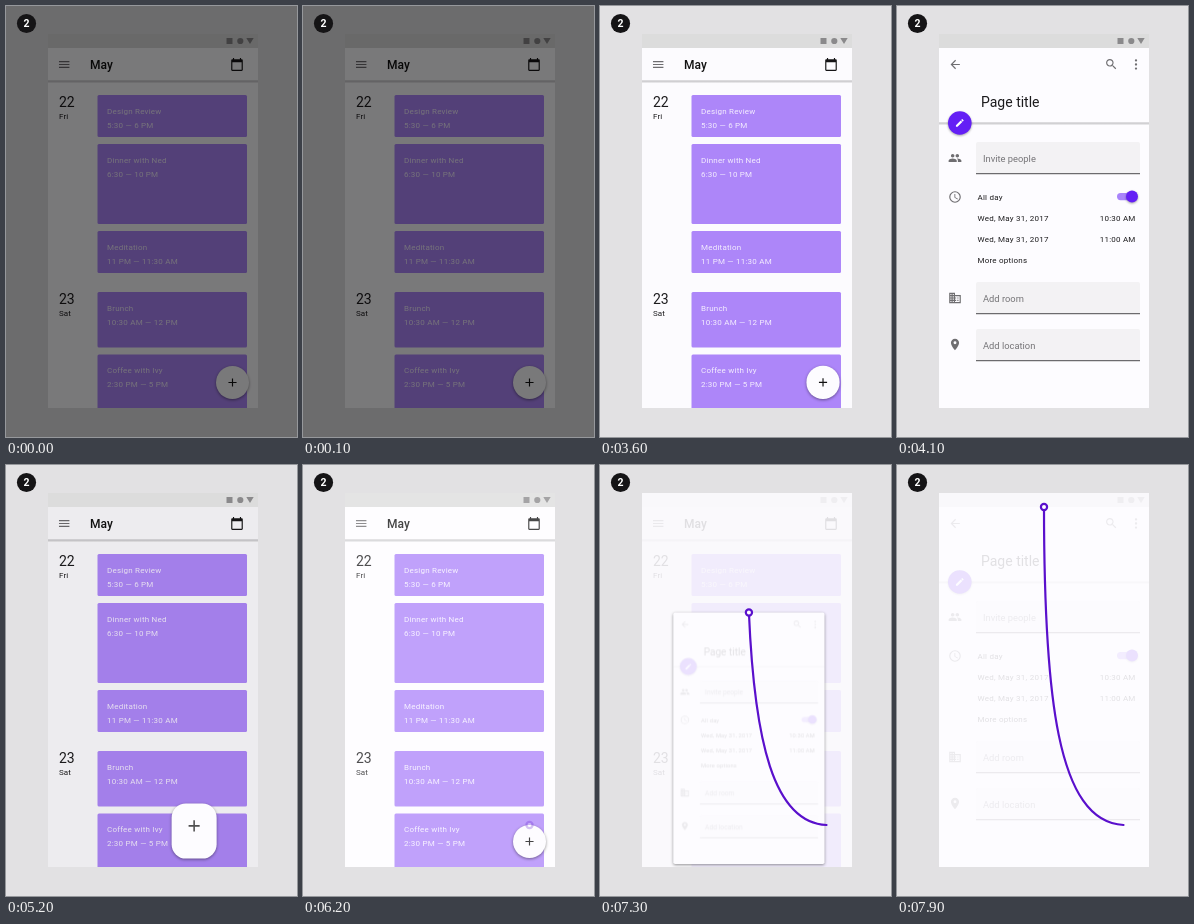
An HTML page for the animation above (8 s loop, 291 by 431 pixels).

```html
<!DOCTYPE html>
<html lang="en">
<head>
<meta charset="utf-8">
<title>Calendar container transform</title>
<style>
  html, body { margin: 0; width: 100%; height: 100%; overflow: hidden; background: #e2e1e3; }
  svg { display: block; width: 100%; height: 100%; }
  text { font-family: Roboto, sans-serif; }
  #box { filter: drop-shadow(0 1.5px 1.8px rgba(0, 0, 0, .42)); }
  .raised { filter: drop-shadow(0 1.2px 1.2px rgba(0, 0, 0, .35)); }
</style>
</head>
<body>
<svg viewBox="0 0 291 431" preserveAspectRatio="none">
  <defs>
    <clipPath id="screen"><rect x="42" y="42" width="210" height="360"/></clipPath>
    <clipPath id="boxClip"><rect id="boxHole"/></clipPath>
    <linearGradient id="fade" x2="0" y2="1">
      <stop stop-color="#000" stop-opacity=".26"/>
      <stop offset="1" stop-color="#000" stop-opacity="0"/>
    </linearGradient>
  </defs>
  <rect width="291" height="431" fill="#e2e1e3"/>
  <rect x="42" y="28" width="210" height="374" fill="#fdfcff"/>
  <rect x="42" y="28" width="210" height="14" fill="#dcdcdc"/>
  <g fill="#8a898b">
    <rect x="220.5" y="32" width="6" height="6"/>
    <circle cx="234.3" cy="35" r="3.1"/>
    <path d="M240.3 32h7.4l-3.7 6z"/>
  </g>
  <g clip-path="url(#screen)">
    <g id="calendar"></g>
    <rect id="scrim" x="42" y="42" width="210" height="360"/>
  </g>
  <rect id="veil" x="42" y="28" width="210" height="374" fill="#fdfcff"/>
  <g clip-path="url(#screen)">
    <rect id="box" fill="#fdfcff"/>
    <g clip-path="url(#boxClip)">
      <g id="page"></g>
      <g id="plus"></g>
    </g>
  </g>
  <path id="trail" fill="none" stroke="#5a10cc" stroke-width="2.2" stroke-linecap="round"/>
  <circle id="ring" r="3.1" fill="#fff" stroke="#5a10cc" stroke-width="2.2"/>
  <rect id="dim" width="291" height="431"/>
  <circle cx="20.5" cy="17.5" r="9.6" fill="#151416"/>
  <text x="20.5" y="21.2" font-size="10.5" font-weight="700" fill="#fff" text-anchor="middle">2</text>
</svg>
<script>
const $ = id => document.getElementById(id);
const set = (id, attrs) => {
  for (const k in attrs) $(id).setAttribute(k, attrs[k]);
};
const clamp = v => Math.min(1, Math.max(0, v));
const lerp = (a, b, t) => a + (b - a) * t;
const ramp = (t, from, span) => clamp((t - from) / span);

const ICONS = {
  menu: 'M3 18h18v-2H3v2zm0-5h18v-2H3v2zm0-7v2h18V6H3z',
  today: 'M20 3h-1V1h-2v2H7V1H5v2H4c-1.1 0-2 .9-2 2v16c0 1.1.9 2 2 2h16c1.1 0 2-.9 2-2V5c0-1.1-.9-2-2-2zm0 18H4V8h16v13z',
  add: 'M19 13h-6v6h-2v-6H5v-2h6V5h2v6h6v2z',
  back: 'M20 11H7.83l5.59-5.59L12 4l-8 8 8 8 1.41-1.41L7.83 13H20v-2z',
  search: 'M15.5 14h-.79l-.28-.27C15.41 12.59 16 11.11 16 9.5 16 5.91 13.09 3 9.5 3S3 5.91 3 9.5 5.91 16 9.5 16c1.61 0 3.09-.59 4.23-1.57l.27.28v.79l5 4.99L20.49 19l-4.99-5zm-6 0C7.01 14 5 11.99 5 9.5S7.01 5 9.5 5 14 7.01 14 9.5 11.99 14 9.5 14z',
  more: 'M12 3a2 2 0 0 1 0 4 2 2 0 0 1 0-4zm0 7a2 2 0 0 1 0 4 2 2 0 0 1 0-4zm0 7a2 2 0 0 1 0 4 2 2 0 0 1 0-4z',
  edit: 'M3 17.25V21h3.75L17.81 9.94l-3.75-3.75L3 17.25zM20.71 7.04a1 1 0 0 0 0-1.41l-2.34-2.34a1 1 0 0 0-1.41 0l-1.83 1.83 3.75 3.75 1.83-1.83z',
  people: 'M16 11c1.66 0 3-1.34 3-3s-1.34-3-3-3-3 1.34-3 3 1.34 3 3 3zm-8 0c1.66 0 3-1.34 3-3S9.66 5 8 5 5 6.34 5 8s1.34 3 3 3zm0 2c-2.33 0-7 1.17-7 3.5V19h14v-2.5c0-2.33-4.67-3.5-7-3.5zm8 0c-.29 0-.62.02-.97.05 1.16.84 1.97 1.97 1.97 3.45V19h6v-2.5c0-2.33-4.67-3.5-7-3.5z',
  clock: 'M12 2a10 10 0 1 0 0 20 10 10 0 1 0 0-20zm0 18a8 8 0 1 1 0-16 8 8 0 1 1 0 16zm.5-13H11v6l5.25 3.15.75-1.23-4.5-2.67z',
  room: 'M12 7V3H2v18h20V7H12zM6 19H4v-2h2v2zm0-4H4v-2h2v2zm0-4H4V9h2v2zm0-4H4V5h2v2zm4 12H8v-2h2v2zm0-4H8v-2h2v2zm0-4H8V9h2v2zm0-4H8V5h2v2zm10 12h-8v-2h2v-2h-2v-2h2v-2h-2V9h8v10zm-2-8h-2v2h2v-2zm0 4h-2v2h2v-2z',
  place: 'M12 2C8.13 2 5 5.13 5 9c0 5.25 7 13 7 13s7-7.75 7-13c0-3.87-3.13-7-7-7zm0 9.5a2.5 2.5 0 0 1 0-5 2.5 2.5 0 0 1 0 5z'
};
const icon = (name, x, y, fill = '#6f6e71', k = .58) =>
  `<path d="${ICONS[name]}" fill="${fill}" fill-rule="evenodd" transform="translate(${x} ${y}) scale(${k}) translate(-12 -12)"/>`;
const text = (s, x, y, size = 8, fill = '#1c1b1d', extra = '') =>
  `<text x="${x}" y="${y}" font-size="${size}" fill="${fill}" ${extra}>${s}</text>`;
const SPACED = 'letter-spacing=".22"';

const event = (y, h, title, hours) =>
  `<rect x="91.5" y="${y}" width="149.5" height="${h}" rx="1.5" fill="#ae87fa"/>` +
  text(title, 101, y + 18.7, 8, '#f6f0ff', SPACED) +
  text(hours, 101, y + 32.7, 8, '#f6f0ff', SPACED);
const day = (y, num, name) =>
  text(num, 53, y, 14) + text(name, 53, y + 12, 8, '#1c1b1d', 'letter-spacing=".1"');
const field = (y, label) =>
  `<path d="M79 ${y + 32}v-30q0-2 2-2h160q2 0 2 2v30z" fill="#f3f2f4"/>
   <rect x="79" y="${y + 31.2}" width="164" height="1" fill="#4c4b4e"/>` +
  text(label, 86, y + 19.6, 9.35, '#757477');
const slot = (y, hour) =>
  text('Wed, May 31, 2017', 80.5, y, 8, '#1c1b1d', 'letter-spacing=".25"') +
  text(hour, 238.5, y, 8, '#1c1b1d', 'text-anchor="end" letter-spacing=".2"');

$('calendar').innerHTML =
  day(101, '22', 'Fri') + day(297.5, '23', 'Sat') +
  event(89, 42, 'Design Review', '5:30 — 6 PM') +
  event(138, 80, 'Dinner with Ned', '6:30 — 10 PM') +
  event(225, 42, 'Meditation', '11 PM — 11:30 AM') +
  event(286, 55.5, 'Brunch', '10:30 AM — 12 PM') +
  event(348.5, 60, 'Coffee with Ivy', '2:30 PM — 5 PM') +
  '<rect x="42" y="74.5" width="210" height="3" fill="url(#fade)"/>' +
  icon('menu', 58.2, 58.5) + text('May', 84, 63, 12, '#111', 'font-weight="500"') +
  icon('today', 231, 58.5, '#151416');

$('page').innerHTML =
  '<rect x="42" y="116.5" width="210" height="3" fill="url(#fade)"/>' +
  icon('back', 58.2, 58.5) + icon('search', 214.3, 58.3) + icon('more', 239, 58.5) +
  text('Page title', 84, 101, 14) +
  '<circle class="raised" cx="62.8" cy="117" r="11.8" fill="#641ff5"/>' +
  icon('edit', 62.8, 117, '#fff', .43) +
  icon('people', 58, 152) + field(136, 'Invite people') +
  icon('clock', 58, 191) + text('All day', 80.5, 194, 8, '#1c1b1d', SPACED) +
  '<rect x="220" y="187" width="17" height="7.2" rx="3.6" fill="#a984fb"/>' +
  '<circle class="raised" cx="235" cy="190.5" r="6" fill="#641ff5"/>' +
  slot(215, '10:30 AM') + slot(236, '11:00 AM') +
  text('More options', 80.5, 257, 8, '#1c1b1d', SPACED) +
  icon('room', 58, 292) + field(276, 'Add room') +
  icon('place', 58, 338.5) + field(323, 'Add location');

$('plus').innerHTML = icon('add', 0, 16.5, '#111');

// Arc followed by the top centre of the container
const ARC = [[226.5, 360], [160, 357], [147, 230], [147, 42]];
const FAB = 33;

function bezier(a, b, c, d, u) {
  const v = 1 - u;
  return v * v * v * a + 3 * v * v * u * b + 3 * v * u * u * c + u * u * u * d;
}

function solve(fn, goal) {
  let lo = 0, hi = 1;
  for (let i = 0; i < 24; i++) {
    const mid = (lo + hi) / 2;
    if (fn(mid) < goal) lo = mid; else hi = mid;
  }
  return (lo + hi) / 2;
}

// cubic-bezier(.4, 0, .2, 1)
function ease(f) {
  if (f <= 0 || f >= 1) return clamp(f);
  return bezier(0, 0, 1, 1, solve(u => bezier(0, .4, .2, 1, u), f));
}

const arcAt = (axis, u) => bezier(...ARC.map(p => p[axis]), u);

function arcParam(p) {
  if (p <= 0 || p >= 1) return clamp(p);
  return solve(u => (360 - arcAt(1, u)) / 318, p);
}

function drawTrail(u) {
  const mix = (a, b) => [lerp(a[0], b[0], u), lerp(a[1], b[1], u)];
  const a = mix(ARC[0], ARC[1]);
  const b = mix(a, mix(ARC[1], ARC[2]));
  const end = [arcAt(0, u), arcAt(1, u)];
  set('trail', { d: `M${ARC[0]}C${a} ${b} ${end}` });
  set('ring', { cx: end[0], cy: end[1] });
}

function draw(t) {
  let f = ramp(t, 3590, 500), p = ease(f);
  if (t >= 4650) {
    f = ramp(t, 4650, 800);
    p = 1 - ease(f);
    f = 1 - f;
  }
  if (t >= 6850) {
    f = ramp(t, 6850, 1050);
    p = ease(f);
  }
  const u = arcParam(p);
  const cx = arcAt(0, u), y = arcAt(1, u);
  const width = lerp(FAB, 210, p), height = lerp(FAB, 360, p);
  const rx = FAB / 2 * (1 - p) ** 2;
  const shape = { x: cx - width / 2, y, width, height, rx };
  set('box', shape);
  set('boxHole', shape);

  const veil = .88 * ramp(t, 6100, 400);
  const ink = 1 - veil;
  set('page', {
    transform: `translate(${cx} ${y}) scale(${width / 210}) translate(-147 -42)`,
    opacity: ink * clamp((p - .2) / .4)
  });
  set('plus', {
    transform: `translate(${cx} ${y}) scale(${width / FAB})`,
    opacity: ink * clamp(1 - p / .25)
  });
  set('scrim', { opacity: .2 * f });
  set('veil', { opacity: veil });
  set('dim', { opacity: .52 * (1 - ramp(t, 2600, 950)) });

  drawTrail(t >= 6850 ? u : 0);
  set('trail', { opacity: t >= 6850 ? 1 : 0 });
  set('ring', { opacity: ramp(t, 6100, 400) });
}

// Plays in steps of 100 ms
const LOOP = 8000, STEP = 100;
let start;
function tick(now) {
  start ??= now;
  draw(Math.floor((now - start) % LOOP / STEP) * STEP);
  requestAnimationFrame(tick);
}
draw(0);
requestAnimationFrame(tick);
</script>
</body>
</html>
```
